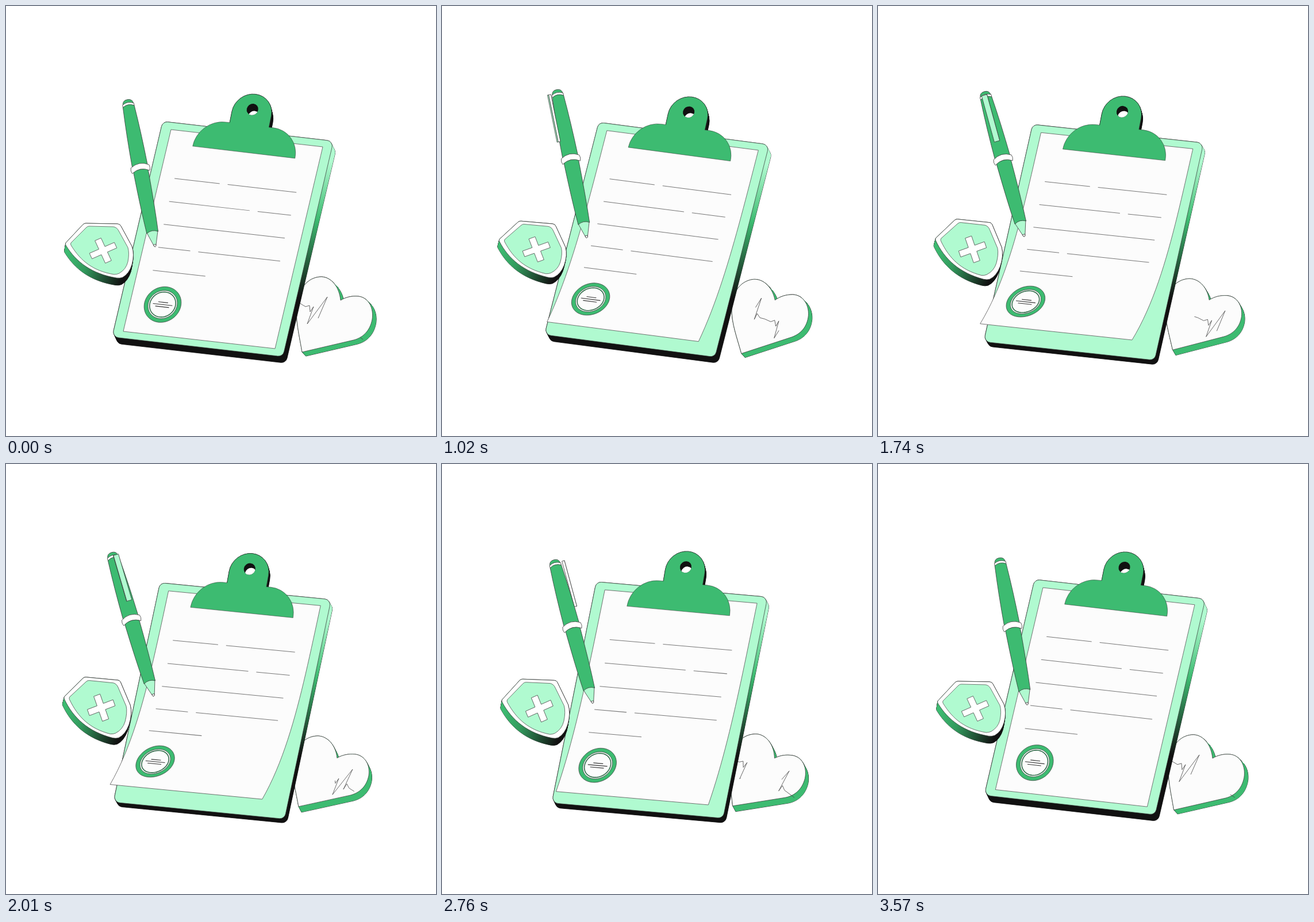
Recreate the animation shown at these times as an HTML page with a canvas. Size 748x748 px, loop 3.6 s.

```html
<!DOCTYPE html>
<html lang="en">
<head>
<meta charset="utf-8">
<title>Clipboard</title>
<style>
html, body { margin: 0; height: 100%; overflow: hidden; background: #fff; }
canvas { display: block; }
</style>
</head>
<body>
<canvas id="stage" width="748" height="748"></canvas>
<script>
const ctx = document.getElementById('stage').getContext('2d');
const LOOP = 3600;
const MINT = '#b0fad0', GREEN = '#3dbb71', PAPER = '#fcfcfc', BLACK = '#111', INK = '#333';

// Time within the loop, its angle, and the sine and cosine that drive every part
let t, angle, sin, cos;
const wave = (c, s) => c * (cos - 1) + s * sin;

// Runs a drawing inside a gentle drift, turn and vertical stretch around a pivot
function sway({ pivot: [x, y], dx, dy, turn, stretch }, drawing) {
  const r = wave(...turn);
  ctx.save();
  ctx.translate(x + wave(...dx), y + wave(...dy));
  ctx.transform(1, r, -r, 1 + wave(...stretch), 0, 0);
  ctx.translate(-x, -y);
  drawing();
  ctx.restore();
}

function draw(path, fill, stroke = INK, width = .7) {
  if (fill) { ctx.fillStyle = fill; ctx.fill(path); }
  if (stroke) { ctx.strokeStyle = stroke; ctx.lineWidth = width; ctx.stroke(path); }
}

function extrude(path, dx, dy, fill) {
  for (const outline of [true, false]) {
    for (let k = 0; k <= 12; k++) {
      ctx.save();
      ctx.translate(dx * k / 12, dy * k / 12);
      outline ? draw(path, null, BLACK, .8) : draw(path, fill, null);
      ctx.restore();
    }
  }
}

function polyline(points, closed = false) {
  const path = new Path2D();
  points.forEach(p => path.lineTo(...p));
  if (closed) path.closePath();
  return path;
}

const sample = (n, point) => Array.from({ length: n + 1 }, (_, i) => point(i / n));

function gradient(x0, y0, x1, y1, ...stops) {
  const g = ctx.createLinearGradient(x0, y0, x1, y1);
  stops.forEach(([k, color]) => g.addColorStop(k, color));
  return g;
}

// Heart with a pulse that runs along it
const heartSway = { pivot: [582, 512], dx: [3, .9], dy: [.3, 0], turn: [.015, -.079], stretch: [.032, 0] };
const heart = new Path2D('M515 602C510 572 503 545 506 520C510 485 530 471 549 471C567 472 580 490 582 512C592 506 602 504 613 505C631 507 640 526 637 545C633 566 620 577 605 581Z');
const beat = 'l10 6l7 -2l1 11l6 -9l-11 30l35 -47l-16 37l6 -10l4 8';
const pulse = `M511 517${beat}l8 3${beat}l18 12`;
const pulseLength = (pulse.match(/l\S+ -?\d+/g)).reduce((sum, step) =>
  sum + Math.hypot(...step.slice(1).split(' ')), 0);
const pulsePath = new Path2D(pulse);

function drawHeart() {
  extrude(heart, 5.8 + .8 * cos, 8.7 - 1.6 * cos - 1.2 * sin, GREEN);
  draw(heart, PAPER);
  ctx.setLineDash([178, pulseLength - 178]);
  ctx.lineDashOffset = 6 - pulseLength * t;
  draw(pulsePath, null, '#444', .8);
}

// Clipboard: board, curling sheet and clip share one sway
const boardSway = { pivot: [377, 405], dx: [.9, -2.35], dy: [-3, -2.5], turn: [.005, .0235], stretch: [-.004, -.016] };

function roundedBoard(radius) {
  const corner = (u, v) => [272.6 + 297 * u - 88 * v, 200.7 + 34.3 * u + 375 * v];
  const path = new Path2D();
  path.moveTo(...corner(.5, 0));
  path.arcTo(...corner(1, 0), ...corner(1, 1), radius);
  path.arcTo(...corner(1, 1), ...corner(0, 1), radius);
  path.arcTo(...corner(0, 1), ...corner(0, 0), radius);
  path.arcTo(...corner(0, 0), ...corner(1, 0), radius);
  path.closePath();
  return path;
}
const board = roundedBoard(10);

function drawSheet() {
  const place = (u, v) => {
    const curl = (1 - cos) * v ** 3.5;
    return [287 + 264 * u - 83 * v - 12.7 * curl, 215 + 30 * u + 351 * v - 10.7 * curl];
  };
  draw(polyline([...sample(24, v => place(1, v)), ...sample(24, v => place(0, 1 - v))], true), PAPER, '#555', .8);

  // Ruled rows, each broken once where its first piece ends
  [79, 141, 212, 56, 92].forEach((cut, row) => {
    const v = .234 + .1137 * row, end = row < 4 ? 212 : cut;
    ctx.setLineDash([cut, 14, 300]);
    draw(polyline([place(.097, v), place(.097 + end / 264, v)]), null, '#777', 1);
  });
  ctx.setLineDash([]);

  const seal = (x, y) => place(.212 + x / 266, .849 + y / 361);
  const ring = (r, fill, stroke, width) => draw(polyline(sample(48, k =>
    seal(r * Math.cos(k * 2 * Math.PI), r * Math.sin(k * 2 * Math.PI))), true), fill, stroke, width);
  ring(31.7, GREEN);
  ring(25, PAPER);
  ring(22.3, PAPER, '#356b4c', 1.6);
  [-8.5, -17, -12].forEach((x, i) =>
    draw(polyline([seal(x, 4 * i - 4), seal(-x, 4 * i - 4)]), null, INK, 1.1));
}

const knob = new Path2D('M-34.5 38V7.5A34.5 34.5 0 0 1 34.5 7.5V38Z');
const clip = new Path2D('M-90 76A48 48.5 0 0 1 -42 27.5H-34.5V7.5A34.5 34.5 0 0 1 34.5 7.5V27.5H42A48 48.5 0 0 1 90 76Z');
const hole = new Path2D('M10 0A10 10 0 1 1 -10 0A10 10 0 1 1 10 0Z');

function drawClip(dx, dy) {
  ctx.transform(.989, .117, -.197, .98, 428.7, 179.9);
  const shift = dx * .5 + dy * .2;
  extrude(knob, shift, dy, BLACK);
  draw(clip, GREEN, INK, .5);
  draw(hole, BLACK, null);
  ctx.clip(hole);
  ctx.translate(shift, dy * 1.08);
  draw(hole, '#fff', null);
}

function drawClipboard() {
  const dx = 4.8 + .5 * cos + sin, dy = 9.5 + 1.8 * cos + 1.5 * sin;
  extrude(board, dx, dy, gradient(0, 238, 0, 510, [0, MINT], [.08, MINT], [.45, GREEN], [.95, BLACK]));
  draw(board, MINT);
  drawSheet();
  drawClip(dx, dy);
}

// Shield with a cross
const shieldSway = { pivot: [165, 422], dx: [2, -2.2], dy: [1.3, -.9], turn: [-.042, .018], stretch: [-.028, -.044] };
const shieldOuter = new Path2D('M104 412L134 380Q136 378 139 378L194 379Q198 379 200 383L219 418Q224 432 219 450Q214 466 203 472Q198 474 192 473C150 466 122 446 104 416Q103 414 104 412Z');
const shieldInner = new Path2D('M113 412L140 385Q142 383 145 383L187 384Q193 385 196 391L212 420Q215 430 212 445Q209 458 197 465Q193 467 188 467C152 461 130 444 113 416Q112 414 113 412Z');
const cross = new Path2D('M-5.5 -5.5v-17h11v17h17v11h-17v17h-11v-17h-17v-11z');

function drawShield() {
  extrude(shieldOuter, -2, 11.5 + cos, gradient(108, 420, 208, 455, [0, GREEN], [.35, '#329a5d'], [1, BLACK]));
  draw(shieldOuter, '#fff');
  draw(shieldInner, MINT, '#444');
  ctx.transform(.96, -.42, .4, .87, 169, 425.5);
  draw(cross, '#fff', '#444');
}

// Pen, spinning once per loop around its own axis
const penSway = { pivot: [211, 162.8], dx: [13.3, 4.5], dy: [6.5, -9.7], turn: [.0434, .037], stretch: [0, .011] };
const penParts = [
  ['M-10 231Q0 225 10 231L1.5 257Q0 259 -1.5 257Z', MINT],
  ['M-2.2 254H2.2L1.5 257Q0 259 -1.5 257Z', '#fff'],
  ['M-13 122H13Q12.5 190 10 233Q0 227 -10 233Q-12.5 190 -13 122Z', GREEN],
  ['M-9.5 9Q-9 0 0 0Q9 0 9.5 9Z', GREEN],
  ['M-10 12V8Q0 2 10 8V12Z', '#fff'],
  ['M-10 12Q0 6 10 12Q13 60 13.5 117H-13.5Q-13 60 -10 12Z', GREEN],
  ['M-16 117Q0 107 16 117Q18 122 15.5 127Q0 117 -15.5 127Q-18 122 -16 117Z', '#fff']
].map(([d, fill]) => [new Path2D(d), fill]);

function drawPen() {
  ctx.translate(211, 162.8);
  ctx.rotate(-.187);
  ctx.scale(1, 1.01);
  const strip = (r0, a0, r1, a1) => {
    const x0 = -r0 * Math.sin(a0), x1 = -r1 * Math.sin(a1);
    return polyline([[x0, 6], [x1, 6], [x1, 88], [x0, 88]], true);
  };
  const near = angle + (sin > 0 ? .28 : -.28);
  const face = () => draw(strip(17.5, angle - .28, 17.5, angle + .28), MINT);
  const edge = () => draw(strip(13, near, 17.5, near), '#fff');
  const body = () => penParts.forEach(([path, fill]) => draw(path, fill));
  (cos > 0 ? [face, edge, body] : [body, edge, face]).forEach(step => step());
}

function frame() {
  t = performance.now() % LOOP / LOOP;
  angle = t * 2 * Math.PI;
  sin = Math.sin(angle);
  cos = Math.cos(angle);
  ctx.clearRect(0, 0, 748, 748);
  ctx.lineJoin = 'round';
  sway(heartSway, drawHeart);
  sway(boardSway, drawClipboard);
  sway(shieldSway, drawShield);
  sway(penSway, drawPen);
  requestAnimationFrame(frame);
}
frame();
</script>
</body>
</html>
```
